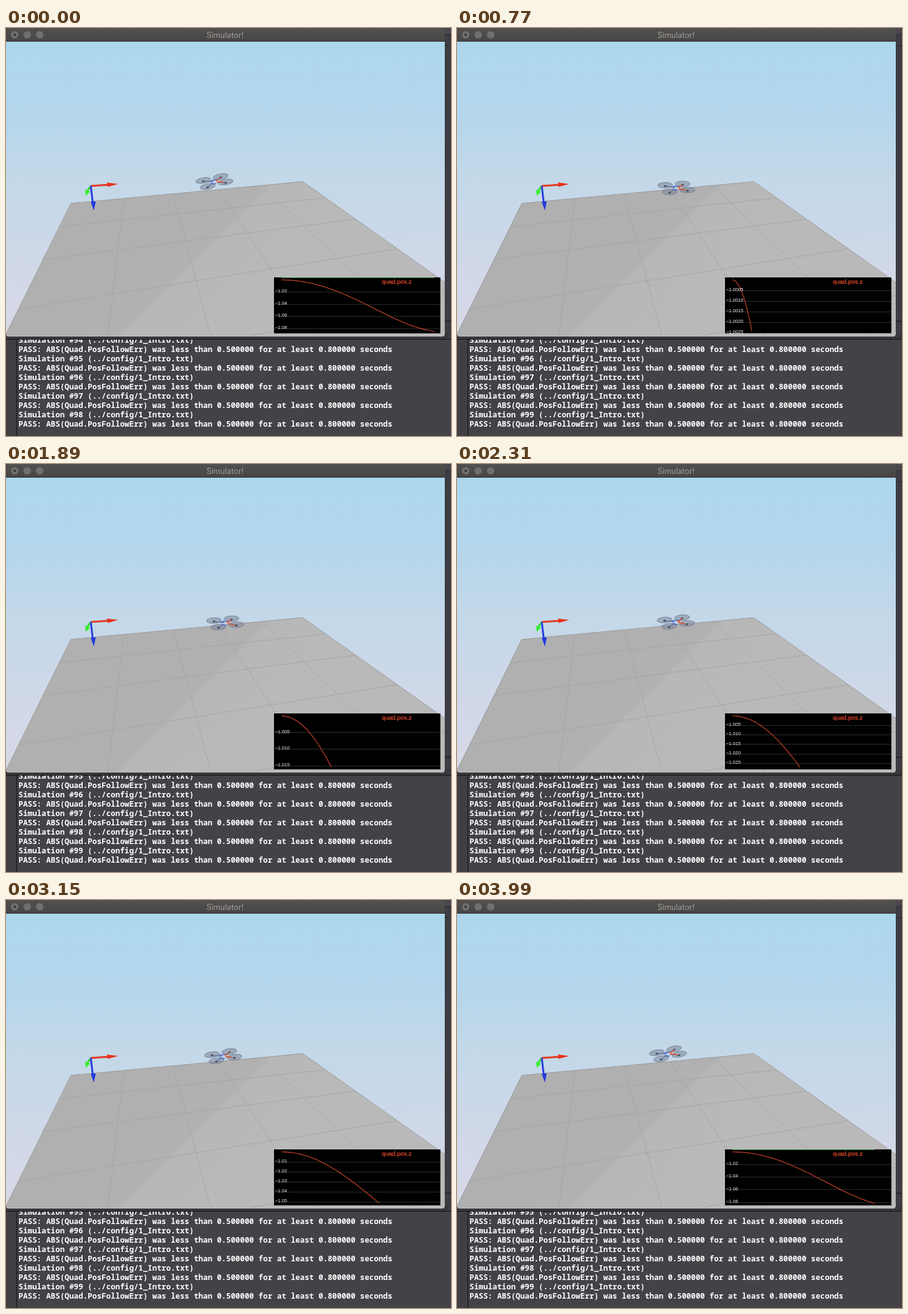
Recreate the animation shown at these times as an HTML page. Size 714x656 px, loop 4060 ms.

```html
<!DOCTYPE html>
<html lang="en">
<head>
<meta charset="utf-8">
<title>Simulator</title>
<style>
  html, body { margin: 0; width: 100%; height: 100%; overflow: hidden; background: #434247; }
  svg { display: block; width: 714px; height: 656px; }
  text { white-space: pre; }
  #console { font: bold 12.35px "Noto Sans Mono", "DejaVu Sans Mono", monospace; fill: #fff; }
  #labels { font: 7.6px "Liberation Sans", Arial, sans-serif; fill: #eee; }
</style>
</head>
<body>
<svg viewBox="0 0 714 656">
  <defs>
    <linearGradient id="sky" x1="0" y1="0" x2="0" y2="1">
      <stop offset="0" stop-color="#add7ee"/>
      <stop offset=".22" stop-color="#b3d6ec"/>
      <stop offset=".45" stop-color="#c2d8e9"/>
      <stop offset=".8" stop-color="#d2d8e8"/>
      <stop offset="1" stop-color="#d8d9e8"/>
    </linearGradient>
    <linearGradient id="floor" gradientUnits="userSpaceOnUse" x1="235" y1="310" x2="365" y2="440">
      <stop offset="0" stop-color="#b0b0b0"/>
      <stop offset=".47" stop-color="#b1b1b1"/>
      <stop offset=".53" stop-color="#b7b7b7"/>
      <stop offset="1" stop-color="#b9b9b9"/>
    </linearGradient>
    <linearGradient id="bar" x1="0" y1="0" x2="0" y2="1">
      <stop offset="0" stop-color="#53514f"/>
      <stop offset="1" stop-color="#474543"/>
    </linearGradient>
    <clipPath id="view"><path d="M0 22H704V491Q704 496 699 496H5Q0 496 0 491Z"/></clipPath>
    <clipPath id="consoleArea"><path d="M18 501H714V656H18Z"/></clipPath>
    <clipPath id="plotArea"><path d="M430 401H697V491H430Z"/></clipPath>
  </defs>

  <!-- desktop and console -->
  <path d="M0 0H714V656H0Z" fill="#434247"/>
  <path d="M704 0H714V500H704Z" fill="#3d3c42"/>
  <path d="M704 0H714V10H704Z" fill="#49484d"/>
  <path d="M704 10.5H714M704 28.5H714" stroke="#2b2a2e"/>
  <path d="M0 490H714V500H0Z" fill="#39383d"/>
  <path d="M0 501H17V656H0Z" fill="#403f43"/>
  <path d="M704 471.5H714M0 500.5H714M17.5 500V656" stroke="#111113"/>
  <g id="console" clip-path="url(#consoleArea)"></g>

  <!-- simulator window -->
  <path d="M0 22V5Q0 0 5 0H699Q704 0 704 5V22Z" fill="url(#bar)"/>
  <path d="M0 21.5H704" stroke="#353433"/>
  <g fill="#716f6d">
    <circle cx="14" cy="11" r="6"/><circle cx="34" cy="11" r="6"/><circle cx="54" cy="11" r="6"/>
  </g>
  <circle cx="14" cy="11" r="2" fill="#343331"/>
  <text x="351.5" y="16" text-anchor="middle" font-family="Inter, sans-serif" font-size="12.6" fill="#a09e9c">Simulator!</text>
  <g clip-path="url(#view)">
    <path d="M0 22H704V496H0Z" fill="url(#sky)"/>
    <path id="ground" fill="url(#floor)" stroke="#999"/>
    <path id="tiles" fill="none" stroke="#a5a5a5"/>
    <g stroke-width="3">
      <path d="M136 254L129 264" stroke="#2fe02f"/>
      <path d="M136 254L165 252" stroke="#e33a24"/>
      <path d="M136 254L139 279" stroke="#2740dc"/>
    </g>
    <path d="M127 260L135 263L128 270Z" fill="#35f02f"/>
    <path d="M162 248.5L180 250.7L163 255.5Z" fill="#e8321c"/>
    <path d="M136 279.5L144 278.5L141 293.5Z" fill="#2038e0"/>
    <g id="drone"></g>
    <path d="M0 495.5H704" stroke="#c9c9c9" opacity=".7"/>
  </g>

  <!-- height plot -->
  <g clip-path="url(#plotArea)">
    <path d="M430 401H697V491H430Z"/>
    <path id="rules" stroke="#2c2c2c"/>
    <path id="setpoint" stroke="#2f9a38"/>
    <path id="curve" fill="none" stroke="#d2462c" stroke-width="1.1"/>
    <g id="labels"></g>
    <text x="603" y="411" font-family="Liberation Sans, Arial, sans-serif" font-size="9.8" fill="#e8492f" stroke="#e8492f" stroke-width=".25">quad.pos.z</text>
  </g>
</svg>
<script>
const LOOP = 4060, STEP = 70, RESET = 210;
const PLOT_X = 442, PLOT_TOP = 405, PLOT_HEIGHT = 82.5;
// [time, right end of the curve]: the simulator runs at an uneven pace
const PACE = [[0, 687], [140, 693], [RESET - 1, 695], [RESET, 442], [280, 444], [350, 448],
  [1120, 494], [1890, 522], [2730, 578], [3500, 616], [3990, 670], [LOOP, 687]];

const el = id => document.getElementById(id);
const setPath = (id, d) => el(id).setAttribute('d', d);

// Perspective image of the floor's 5 by 5 tile grid
function floorPoint(i, j) {
  const w = 1 + 0.0368 * i - 0.1447 * j;
  return [(104 + 91.93 * i - 30.9 * j) / w, (282 + 2.09 * i - 8.75 * j) / w].map(n => n.toFixed(1));
}

function drawFloor() {
  setPath('ground', `M${floorPoint(0, 0)}L${floorPoint(5, 0)}L${floorPoint(5, 5)}L${floorPoint(0, 5)}Z`);
  let lines = '';
  for (let k = 1; k < 5; k++) {
    lines += `M${floorPoint(k, 0)}L${floorPoint(k, 5)}M${floorPoint(0, k)}L${floorPoint(5, k)}`;
  }
  setPath('tiles', lines);
}

function drawConsole(first) {
  let lines = '';
  for (let k = 0; k < 10; k++) {
    const message = k % 2
      ? 'PASS: ABS(Quad.PosFollowErr) was less than 0.500000 for at least 0.800000 seconds'
      : `Simulation #${first + k / 2} (../config/1_Intro.txt)`;
    lines += `<text x="20" y="${506 + 15 * k}">${message}</text>`;
  }
  el('console').innerHTML = lines;
}

function curveEnd(time) {
  const k = PACE.findIndex(([t]) => t > time);
  const [t0, x0] = PACE[k - 1], [t1, x1] = PACE[k];
  return x0 + (x1 - x0) * (time - t0) / (t1 - t0);
}

// Height gained after the curve has advanced u pixels
const climb = u => 2.5e-6 * u * u * (1 - 0.438 * (u / 245) ** 2.14);

function drawPlot(end) {
  const gained = climb(end), range = Math.max(0.001, gained);
  const top = (range - gained) / 2;
  const yOf = height => PLOT_TOP + (height + top) / range * PLOT_HEIGHT;

  const step = [0.0005, 0.001, 0.002, 0.005, 0.01, 0.02].find(s => range / s <= 7);
  const digits = Math.ceil(-Math.log10(step) - 1e-9);
  let rules = '', labels = '';
  for (let k = top > 0 ? 0 : 1; yOf(k * step) < 491; k++) {
    const y = yOf(k * step);
    rules += `M430 ${Math.floor(y) + 0.5}H697`;
    labels += `<text x="431.7" y="${(y + 0.6).toFixed(1)}">−${(1 + k * step).toFixed(digits)}</text>`;
  }
  setPath('rules', rules);
  el('labels').innerHTML = labels;

  let points = '';
  for (let u = 0; u < end; u += 3) points += `${PLOT_X + u},${yOf(climb(u)).toFixed(2)} `;
  setPath('curve', `M${points}${PLOT_X + end},${yOf(gained).toFixed(2)}`);
  setPath('setpoint', end > 200 ? `M${PLOT_X} 401.5H${PLOT_X + end}` : '');
}

function drawDrone(end) {
  const progress = end / 245;
  const x = 352 - 17.5 * progress ** 3.6, y = 257.5 - 125 * climb(end);
  const tilt = 0.15 * Math.sin(progress * Math.PI / 2) ** 2;
  const rotors = [[-18, -4.5], [10, -6.5], [-11, 6.3], [18, 3.4]];
  const arms = ['#5566a8', '#d8553a', '#5566a8', '#d8553a'];
  const body = rotors.map(([rx, ry], k) => `
    <path d="M0 0L${rx} ${ry + 1.5}" stroke="${arms[k]}" stroke-width="1.6"/>
    <ellipse cx="${rx}" cy="${ry}" rx="12" ry="4.5" fill="#7d879c" fill-opacity=".55" stroke="#70788a" stroke-width=".8"/>
    <path d="M${rx - 2} ${ry + 1}h4M${rx} ${ry}v3" stroke="#3c4352" stroke-width="1.5"/>`).join('');
  el('drone').innerHTML = `<g transform="matrix(1 ${-tilt} 0 1 ${x} ${y})">${body}
    <path d="M-6 -2L4 -3M-6 2L3 4M-3 -4L-1 5" stroke="#4a6fc4" stroke-width="1.3"/>
    <path d="M-3 -1H4V2H-3Z" fill="#c3cee2"/>
    <path d="M4 0L10 -5M4 1L14 3" stroke="#dc5638" stroke-width="1.5"/></g>`;
}

let shown = -1;
function frame(now) {
  const time = Math.floor(now % LOOP / STEP) * STEP;
  if (time !== shown) {
    shown = time;
    const end = curveEnd(time) - PLOT_X;
    drawConsole(time < RESET ? 94 : 95);
    drawPlot(end);
    drawDrone(end);
  }
  requestAnimationFrame(frame);
}

drawFloor();
const start = performance.now();
const tick = now => frame(Math.max(0, now - start));
(function run() {
  tick(performance.now());
})();
</script>
</body>
</html>
```
